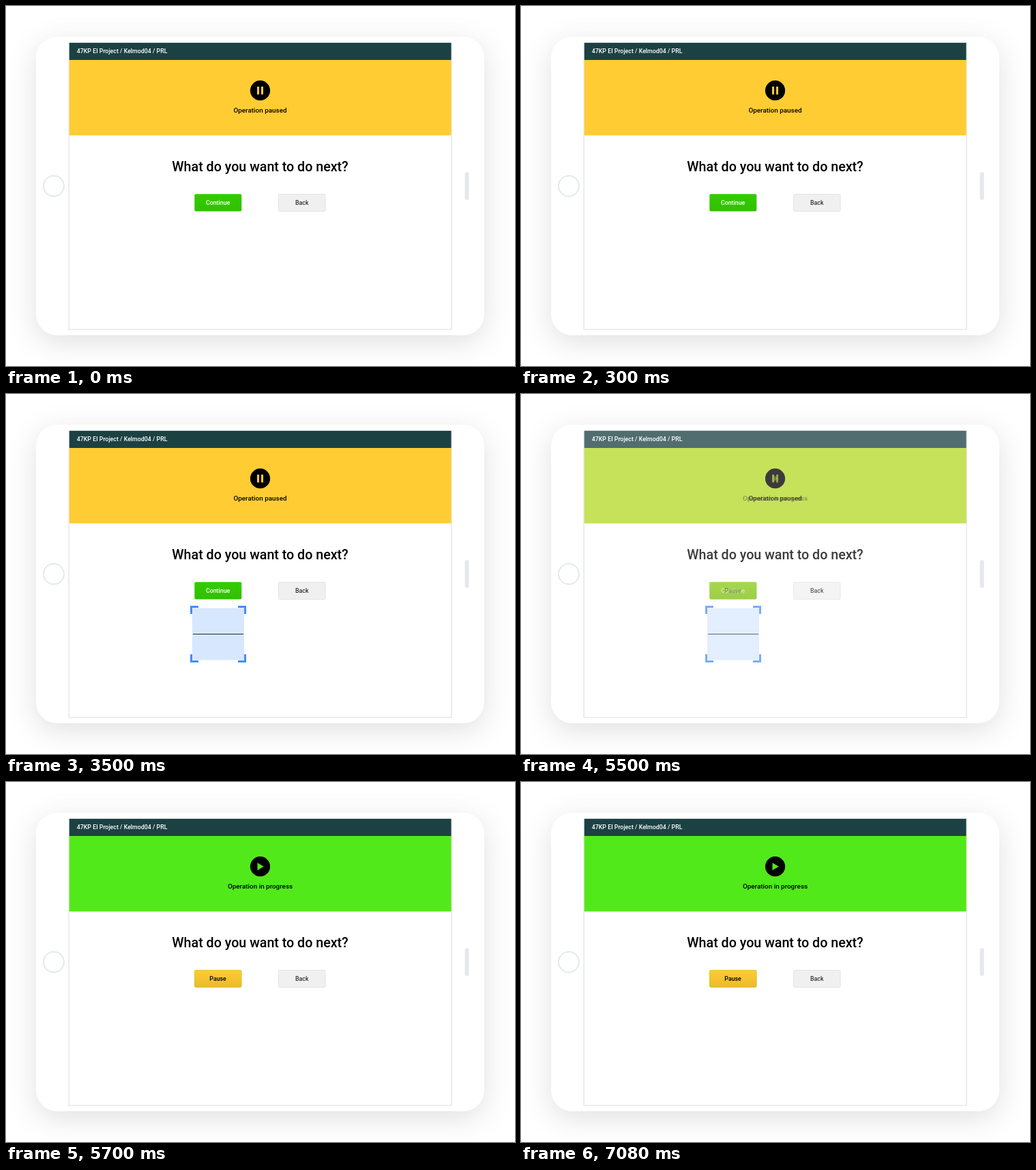
Write an HTML page that moves like this. It is 746 px wide and 527 px high and loops after 8000 ms.

```html
<!DOCTYPE html>
<html lang="en">
<head>
<meta charset="utf-8">
<title>Operation control</title>
<style>
  html, body { margin: 0; width: 100%; height: 100%; overflow: hidden; background: #fff; }
  svg { display: block; width: 746px; height: 527px; }
  text { font: 500 8.8px Roboto, sans-serif; }
  .mid { text-anchor: middle; }
  .status { font-size: 9.9px; }
  .title { font-size: 19.65px; }
  .plain { font-weight: 400; }
  .tablet { fill: #fff; filter: drop-shadow(0 10px 20px rgba(0, 0, 0, .12)); }
  .trim { fill: none; stroke: #e5e8ee; stroke-width: 1.5; }
</style>
</head>
<body>
<svg viewBox="0 0 746 527">
  <defs>
    <linearGradient id="green" x2="0" y2="1">
      <stop stop-color="#34cc02"/><stop offset="1" stop-color="#30c000"/>
    </linearGradient>
    <linearGradient id="amber" x2="0" y2="1">
      <stop stop-color="#ffcc33"/><stop offset="1" stop-color="#ebba2b"/>
    </linearGradient>
  </defs>

  <rect class="tablet" x="44" y="45" width="657" height="437" rx="31"/>
  <circle class="trim" cx="70" cy="263.5" r="15" style="stroke-width:2"/>
  <rect x="672.5" y="243" width="6" height="41" rx="3" fill="#e5e8ee"/>
  <path class="trim" d="M92.2 54V473.5H653V54"/>

  <rect x="92.8" y="53.8" width="559.7" height="25.2" fill="#1c4143"/>
  <rect x="92.8" y="79" width="559.7" height="110.4" fill="#ffcc33"/>
  <rect class="next" x="92.8" y="79" width="559.7" height="110.4" fill="#52e91b"/>

  <circle cx="372.5" cy="123.7" r="14.6"/>
  <path class="prev" d="M368 118h3v11.5h-3zM374 118h3v11.5h-3z" fill="#ffcc33"/>
  <path class="next" d="M368.5 118.3L377.7 123.8L368.5 129.3z" fill="#52e91b"/>
  <text class="mid status prevText" x="372.5" y="156">Operation paused</text>
  <text class="mid status nextText" x="372.5" y="156">Operation in progress</text>

  <text class="mid title" x="372.5" y="242">What do you want to do next?</text>

  <rect x="276.3" y="275.2" width="69" height="25.4" rx="2" fill="url(#green)"/>
  <rect class="next" x="276.3" y="275.2" width="69" height="25.4" rx="2" fill="url(#amber)"/>
  <text class="mid prev" x="310.6" y="291" fill="#fff">Continue</text>
  <text class="mid nextText" x="310.6" y="291">Pause</text>
  <rect x="399.5" y="275.5" width="68.5" height="25" rx="2" fill="#f0f0f0" stroke="#e3e3e3"/>
  <text class="mid plain" x="433.7" y="291">Back</text>

  <g class="scan">
    <rect x="273" y="313.5" width="76" height="76" fill="#4a90f8" opacity=".22"/>
    <path d="M274 351.5H348" stroke="#1b2a45"/>
    <path d="M271.5 322V311.5H282M340 311.5H350.5V322M350.5 381V391.5H340M282 391.5H271.5V381"
      fill="none" stroke="#468cf7" stroke-width="3"/>
  </g>

  <rect class="veil" x="92.8" y="53.8" width="559.7" height="419" fill="#fff"/>
  <text x="103.8" y="69" fill="#fff">47KP EI Project / Kelmod04 / PRL</text>
</svg>
<script>
  const LOOP = 8000;
  const steps = [
    { at: 0, next: 0, prevText: 1, nextText: 0, scan: 0, veil: 0 },
    { at: 500, next: 0, prevText: 1, nextText: 0, scan: 1, veil: 0 },
    { at: 5500, next: .43, prevText: 1, nextText: .45, scan: .93, veil: .23 },
    { at: 5600, next: .86, prevText: 0, nextText: 1, scan: .47, veil: .23 },
    { at: 5700, next: 1, prevText: 0, nextText: 1, scan: 0, veil: 0 }
  ];

  function fade(name, opacity) {
    for (const el of document.querySelectorAll('.' + name)) el.style.opacity = opacity;
  }

  function draw() {
    const time = performance.now() % LOOP;
    const { at, ...levels } = steps.findLast(step => step.at <= time);
    for (const name in levels) fade(name, levels[name]);
    fade('prev', 1 - levels.next);
    requestAnimationFrame(draw);
  }
  draw();
</script>
</body>
</html>
```
